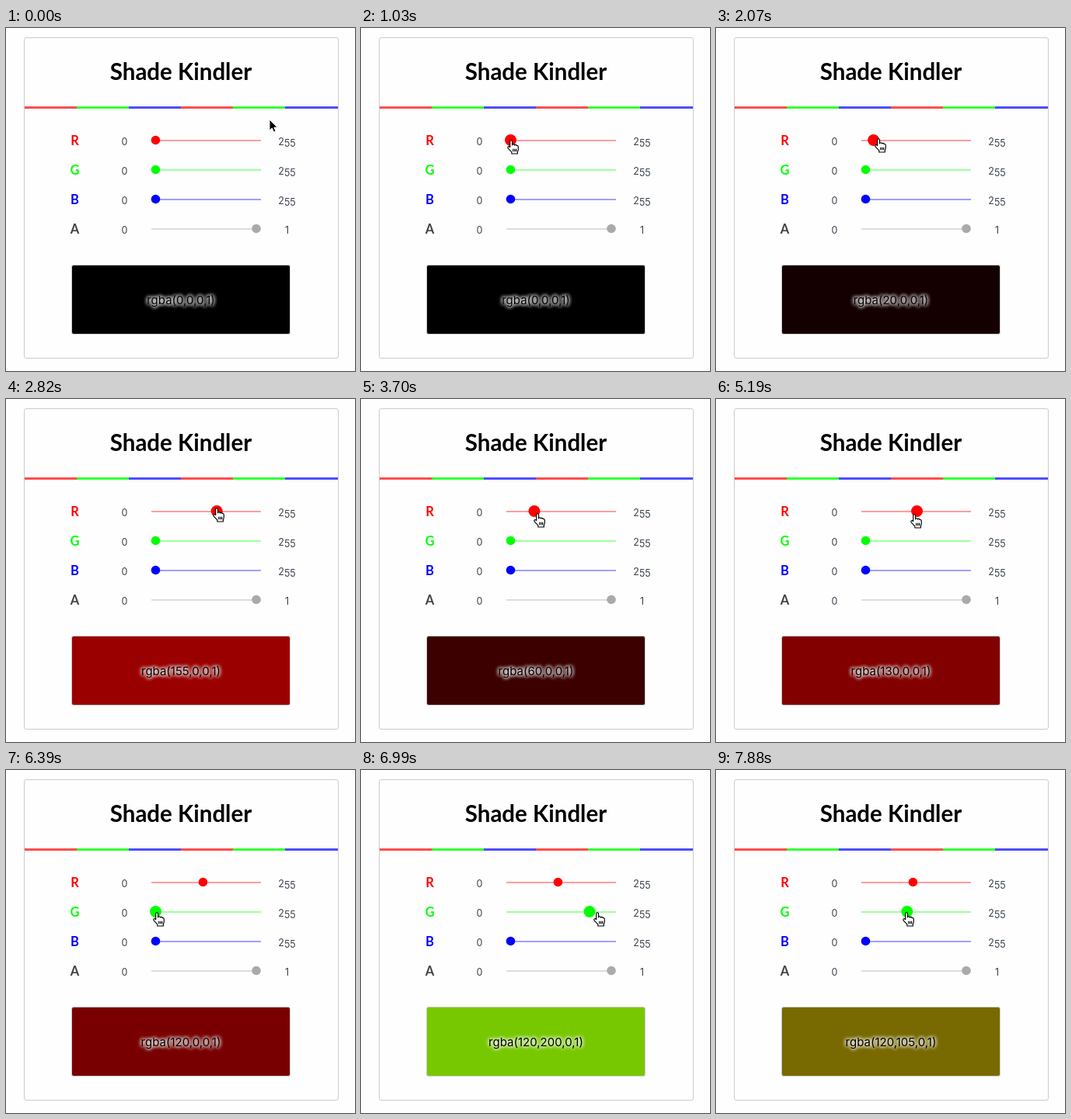
An HTML page for the animation above (8000 ms loop, 449 px wide and 442 px high).

```html
<!DOCTYPE html>
<html lang="en">
<head>
<meta charset="utf-8">
<style>
  html, body { margin: 0; width: 100%; height: 100%; overflow: hidden; background: #fefefe; }
  svg { position: absolute; left: 0; top: 0; }
  text { text-anchor: middle; }
  .title { font: 700 29.5px Lato, sans-serif; }
  .label { font: 700 16.5px Lato, sans-serif; }
  .limit { font: 400 12.5px Inter, sans-serif; fill: #3c4450; }
  #swatch {
    position: absolute; left: 84px; top: 305px; width: 282px; height: 90px;
    box-sizing: border-box; border: 1px solid #ccc; border-radius: 3px;
    font: 15px/89px Inter, sans-serif; text-align: center; color: #000;
    text-shadow: 0 0 5px #fff, 0 0 5px #fff, 0 0 5px #fff;
  }
</style>
</head>
<body>
<div id="swatch"></div>
<svg width="449" height="442" viewBox="0 0 449 442">
  <rect x="23.5" y="12.5" width="404" height="413" rx="2.5" fill="none" stroke="#ccc"/>
  <text class="title" x="225" y="67">Shade Kindler</text>
  <g id="stripes"></g>
  <g id="rows"></g>
  <g id="cursor">
    <path id="arrow" d="M0 0V14L3.3 11 5.4 16 8 15 5.9 10.1H10.2Z" fill="#000" stroke="#fff"/>
    <path id="hand" transform="translate(-5 -1) scale(1.06)" fill="#fff" stroke="#000" stroke-width="1.1" stroke-linejoin="round"
      d="M3.5 9V2.2Q3.5.7 4.8.7T6.2 2.2V6.5q.2-1.2 1.3-1.1t1.4 1.3q.3-.9 1.3-.7t1.2 1.3q.4-.6 1.1-.3t1 1.4V11.5q0 1.5-.9 3V17H5.5V15L1.2 10.5Q.2 9.2 1.2 8.4T3.5 9ZM7.3 11v3.4M9.2 11v3.4M11 11v3.4"/>
  </g>
</svg>
<script>
const LOOP = 8000, STEP = 148.2;
const LEAD = 0.4; // steps by which the pointer runs ahead of the dragged knob
const RED_GRAB = 7, RED_DROP = 36, GREEN_GRAB = 40;
const $ = id => document.getElementById(id);

const mix = (a, b, u) => a + (b - a) * u;
function ease(u) {
  u = Math.min(1, Math.max(0, u));
  return u * u * (3 - 2 * u);
}

// Eases through [step, value] stops and holds outside them.
const through = (stops, step) => stops.reduce((value, [at, target], i) =>
  i ? mix(value, target, ease((step - stops[i - 1][0]) / (at - stops[i - 1][0]))) : target, 0);

const redAt = step => through([[12.5, 0], [19, 155], [20, 155], [24, 50], [31, 215], [36, 120]], step);
const greenAt = step => through([[43, 0], [48.5, 245], [53.5, 103]], step);
const pointerY = step => through([[0, 118], [7, 145], [19, 141], [25, 148], [36, 149], [40, 184]], step);
const knobX = value => 192.5 + value / 255 * 129.5;
const snap = value => Math.round(value / 5) * 5;

function pointerX(step) {
  const onRed = knobX(redAt(step + LEAD)), onGreen = knobX(greenAt(step + LEAD));
  if (step < RED_GRAB) return mix(339, onRed, ease(step / RED_GRAB));
  return mix(onRed, onGreen, ease((step - RED_DROP) / (GREEN_GRAB - RED_DROP)));
}

$('stripes').innerHTML = [0, 1, 2, 3, 4, 5].map(i =>
  `<rect x="${24 + i * 67}" y="101" width="${i < 5 ? 67 : 68}" height="3" fill="${['#ff4d4d', '#3f3', '#4d4dff'][i % 3]}"/>`
).join('');

const oldStyle255 = '2<tspan dy="2">55</tspan>';
const rows = [
  ['R', '#f00', '#f00', '#ff9f9f', oldStyle255],
  ['G', '#0f0', '#0f0', '#9fff9f', oldStyle255],
  ['B', '#00f', '#00f', '#9f9fff', oldStyle255],
  ['A', '#444', '#aaa', '#ddd', '1']
];
$('rows').innerHTML = rows.map(([name, ink, knob, line, max], i) => `
  <g transform="translate(0 ${i * 38})">
    <text class="label" x="88.5" y="151" fill="${ink}">${name}</text>
    <text class="limit" x="152.5" y="151">0</text>
    <rect x="187" y="144" width="141" height="2" fill="${line}"/>
    <circle cy="144.5" fill="${knob}"/>
    <text class="limit" x="361.5" y="151">${max}</text>
  </g>`).join('');
const knobs = document.querySelectorAll('circle');

function draw(time) {
  const step = Math.floor((time % LOOP + 20) / STEP);
  const red = snap(redAt(step)), green = snap(greenAt(step));
  const active = step >= GREEN_GRAB ? 1 : step >= RED_GRAB && step <= RED_DROP ? 0 : -1;

  [red, green, 0, 255].forEach((value, i) => {
    knobs[i].setAttribute('cx', knobX(value));
    knobs[i].setAttribute('r', i === active ? 7.5 : 5.8);
  });

  const color = `rgba(${red},${green},0,1)`;
  $('swatch').style.backgroundColor = color;
  $('swatch').textContent = color;

  $('cursor').setAttribute('transform', `translate(${Math.round(pointerX(step))} ${Math.round(pointerY(step))})`);
  $('arrow').style.display = active < 0 ? '' : 'none';
  $('hand').style.display = active < 0 ? 'none' : '';
}

let start;
function tick(now) {
  start ??= now;
  draw(now - start);
  requestAnimationFrame(tick);
}
draw(0);
requestAnimationFrame(tick);
</script>
</body>
</html>
```
